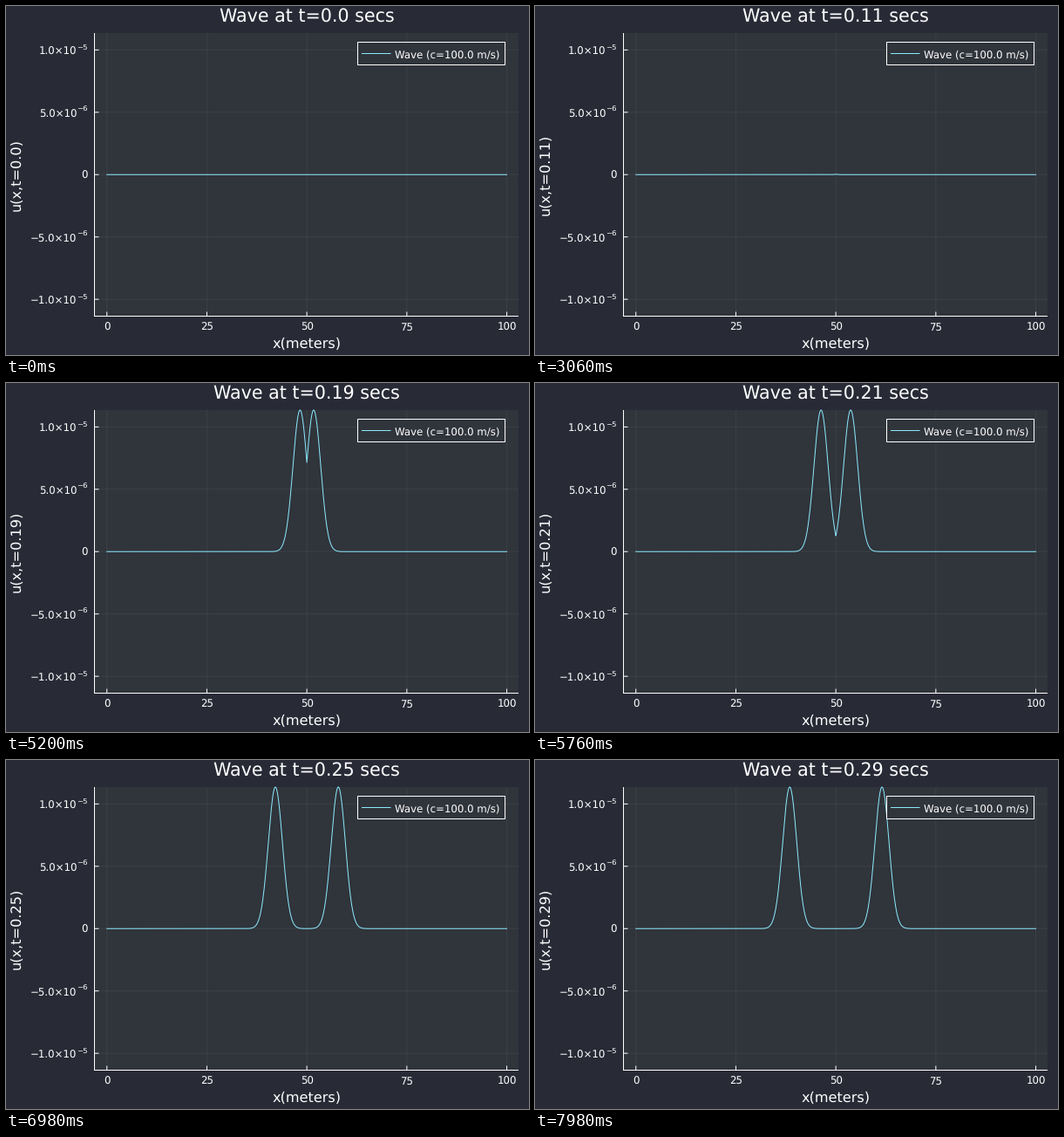
A matplotlib script that plays this animation: 600x400 px, repeating every 8000 ms.

```python
import numpy as np
import matplotlib.pyplot as plt
from matplotlib.animation import FuncAnimation
from matplotlib.patches import Rectangle

plt.rcParams.update({
    "font.family": "DejaVu Sans",
    "text.hinting": "none",
    "path.snap": False,
})

W, H, DPI = 600, 400, 100
PX = 72 / DPI  # points per pixel
BG, PANEL, FG, CYAN = "#282a36", "#30343b", "#ffffff", "#8be9fd"

LEFT, RIGHT, TOP, BOTTOM = 101.5, 588, 31, 355.5
X0, X_SCALE = 115.75, 4.588       # pixels of x = 0, pixels per meter
Y0, Y_STEP = 193.25, 71.45        # pixels of u = 0, pixels per 5e-6
TICK = 5
SMALL, MEDIUM, LARGE, EXPONENT = 11.76, 16.17, 20.58, 8.5

SPEED = 100.0                     # m/s
DT = 1 / 600                      # simulated seconds per step
T_PEAK = 0.16965                  # time the crest leaves the centre
PULSE_WIDTH = 2.5                 # meters
PEAK = 162.3                      # crest height in pixels

fig = plt.figure(figsize=(W / DPI, H / DPI), dpi=DPI, facecolor=BG)
ax = fig.add_axes([0, 0, 1, 1])
ax.set_xlim(0, W)
ax.set_ylim(H, 0)
ax.axis("off")


def segment(x1, y1, x2, y2, color=FG, z=2, **kw):
    ax.plot([x1, x2], [y1, y2], color=color, lw=PX, zorder=z,
            solid_capstyle="butt", **kw)


def label(x, y, s, size, ha="center", **kw):
    return ax.text(x, y, s, fontsize=size * PX, color=FG, ha=ha,
                   va="baseline", zorder=7, **kw)


def box(x, y, w, h, z, edge="none"):
    ax.add_patch(Rectangle((x, y), w, h, facecolor=PANEL, edgecolor=edge,
                           lw=PX, zorder=z))


box(LEFT, TOP, RIGHT - LEFT, BOTTOM - TOP, 0)

# Horizontal axis
for meters in range(0, 101, 25):
    x = X0 + X_SCALE * meters
    segment(x, TOP, x, BOTTOM, z=1, alpha=0.06)
    segment(x, BOTTOM, x, BOTTOM - TICK)
    label(x, 371.4, str(meters), SMALL)

# Vertical axis
y_ticks = [("1.0×10", "−5"), ("5.0×10", "−6"), ("0", ""),
           ("−5.0×10", "−6"), ("−1.0×10", "−5")]
for i, (mantissa, power) in enumerate(y_ticks):
    y = Y0 + (i - 2) * Y_STEP
    segment(LEFT, y, RIGHT, y, z=1, alpha=0.06)
    segment(LEFT, y, LEFT + TICK, y)
    if power:
        label(81.5, y + 5.7, mantissa, SMALL, ha="right")
        label(94, y - 0.5, power, EXPONENT, ha="right")
    else:
        label(94, y + 4.4, mantissa, SMALL, ha="right")

segment(LEFT, TOP, LEFT, BOTTOM + 0.5)
segment(LEFT, BOTTOM, RIGHT, BOTTOM)
label(345, 391.4, "x(meters)", MEDIUM)

# Legend
box(403.5, 41.5, 169, 26, 5, edge=FG)
segment(408, 54.5, 441.5, 54.5, color=CYAN, z=6)
label(446, 59.2, "Wave (c=100.0 m/s)", SMALL, ha="left")

title = label(345, 18.1, "", LARGE)
y_label = ax.text(16.1, Y0, "", fontsize=MEDIUM * PX, color=FG, rotation=90,
                  ha="right", va="center", rotation_mode="default")
y_label.set(rotation_mode="anchor", ha="center", va="baseline")

meters = np.linspace(0, 100, 1001)
wave, = ax.plot(X0 + X_SCALE * meters, np.full_like(meters, Y0),
                color=CYAN, lw=PX, zorder=4)


def step_at(frame):
    """Three steps per seven frames; the middle one is held for five."""
    cycle, phase = divmod(frame, 7)
    return 3 * cycle + (phase >= 1) + (phase >= 6)


def update(frame):
    step = step_at(frame)
    seconds = (step + 3) // 6 / 100
    title.set_text(f"Wave at t={seconds} secs")
    y_label.set_text(f"u(x,t={seconds})")

    crest = SPEED * (step * DT - T_PEAK)
    offset = np.abs(meters - 50) - crest
    wave.set_ydata(Y0 - PEAK * np.exp(-(offset / PULSE_WIDTH) ** 2))
    return title, y_label, wave


anim = FuncAnimation(fig, update, frames=400, interval=20, repeat=True,
                     repeat_delay=0)
plt.show()
```
